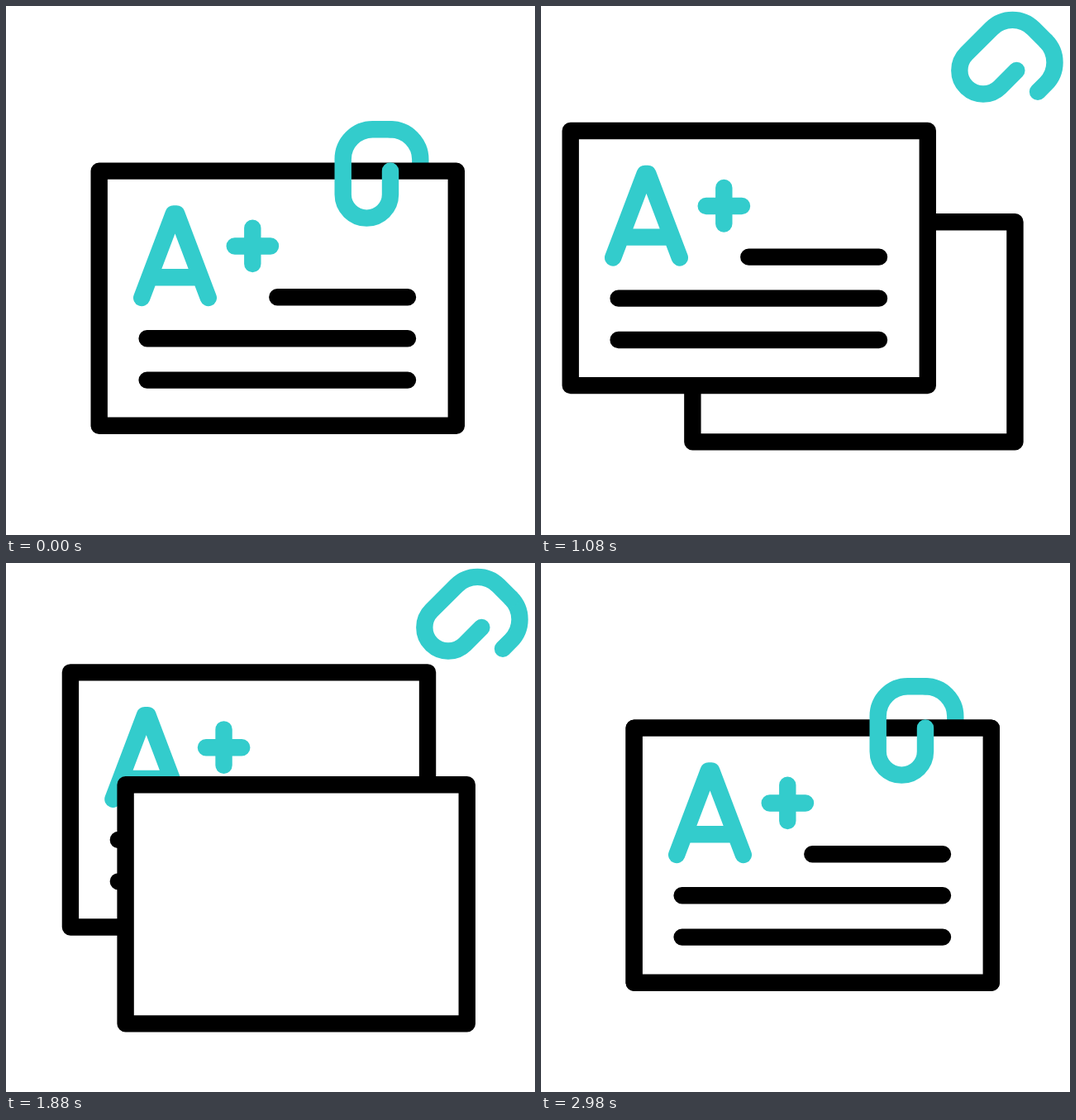
An HTML page for the animation above (3.22 s loop, 640x640 px).

```html
<!DOCTYPE html>
<html lang="en">
<head>
<meta charset="utf-8">
<title>Graded paper</title>
<style>
  html, body { margin: 0; width: 100%; height: 100%; overflow: hidden; background: #fff; }
  svg { display: block; width: 100vw; height: 100vh; }
  .ink, .teal { fill: none; stroke: #000; stroke-width: 20.4; stroke-linecap: round; stroke-linejoin: round; }
  .teal { stroke: #33cccc; }
  .sheet { fill: #fff; }
</style>
</head>
<body>
<svg viewBox="0 0 640 640">
  <defs>
    <g id="grade" class="teal">
      <path d="M164.2 353L202.7 251.4H206.3L244.8 353M177 328.2H232"/>
      <path d="M276.7 290.5H320M298.3 268.6V312"/>
    </g>
  </defs>

  <!-- the far arm of the clip passes behind the paper -->
  <path id="clipBack" class="teal" d="M501.3 199.5V185.6A36.3 36.3 0 0 0 465 149.3"/>

  <g id="stack">
    <g id="oldCard">
      <rect class="ink sheet" x="112.7" y="199.6" width="432.1" height="308.1"/>
      <use href="#grade"/>
      <path class="ink" d="M328.3 352.2H486M170.6 402.2H486M170.6 452.6H486"/>
    </g>
    <g id="newCard">
      <rect id="newSheet" class="ink sheet"/>
      <use id="newGrade" href="#grade"/>
      <path id="newLines" class="ink"/>
    </g>
  </g>

  <path id="clipFront" class="teal" d="M465 149.3H443.8A36 36 0 0 0 407.7 185.3V228A28.65 28.65 0 0 0 465 228V199.5"/>
</svg>
<script>
const LOOP = 3220, STEP = 20;
const LINES = [
  { x: 328.3, y: 352.2, start: 2360 },
  { x: 170.6, y: 402.2, start: 2323 },
  { x: 170.6, y: 452.6, start: 2284 }
];
const $ = id => document.getElementById(id);
const part = (t, from, to) => Math.min(1, Math.max(0, (t - from) / (to - from)));
const ease = (t, from, to) => {
  const s = part(t, from, to);
  return s * s * (3 - 2 * s);
};

// The clip swings away along a curve, then returns the same way.
function drawClip(t) {
  const p = ease(t, 215, 600) - ease(t, 2237, 2613);
  const bend = 2 * p * (1 - p);
  const x = 111 * (bend * 0.107 + p * p);
  const y = -130 * (bend * 0.722 + p * p);
  const move = `translate(${x} ${y}) rotate(${45 * p} 454.4 203)`;
  $("clipBack").setAttribute("transform", move);
  $("clipFront").setAttribute("transform", move);
}

function drawCards(t) {
  const back = 1 - ease(t, 1510, 2205);
  const slide = 68 * part(t, 452, 880) ** 1.3 + 9 * (1 - (1 - part(t, 880, 967)) ** 2);
  const x = slide * back;
  const y = 149 * ease(t, 880, 1404) * back;
  $("oldCard").setAttribute("transform", `translate(${-x} ${-y})`);

  // The new sheet moves the opposite way and grows to full size on return.
  const w = 432.1 - 42 * back, h = 308.1 - 42 * back;
  const sheet = $("newSheet");
  sheet.setAttribute("x", 328.75 + 0.645 * x - w / 2);
  sheet.setAttribute("y", 353.65 + 0.9 * y - 3 * back - h / 2);
  sheet.setAttribute("width", w);
  sheet.setAttribute("height", h);

  const top = t < 1440 ? $("oldCard") : $("newCard");
  if ($("stack").lastElementChild !== top) $("stack").append(top);
}

// Lines shoot a little past their end and settle.
function drawContent(t) {
  $("newGrade").setAttribute("opacity", part(t, 2380, 2840));
  $("newLines").setAttribute("d", LINES.filter(l => t > l.start).map(l => {
    const grow = ease(t, l.start, 2840);
    const end = l.x + (493.5 - l.x) * grow - 7.5 * ease(t, 2840, 2980);
    return `M${l.x} ${l.y}L${end} ${l.y + 0.6 * (1 - grow)}`;
  }).join(""));
}

function frame() {
  const t = Math.floor(performance.now() % LOOP / STEP) * STEP;
  drawClip(t);
  drawCards(t);
  drawContent(t);
  requestAnimationFrame(frame);
}
frame();
</script>
</body>
</html>
```
